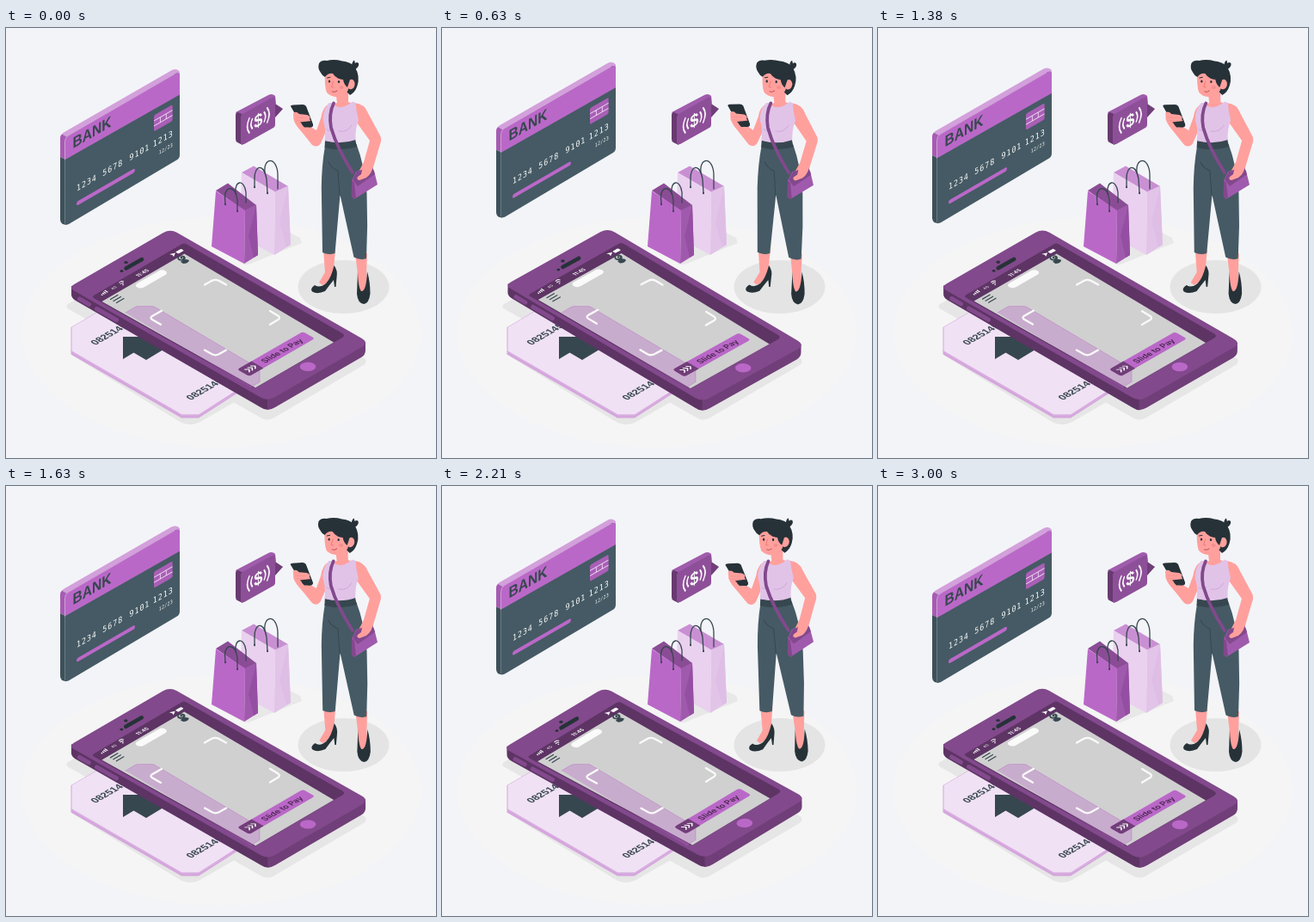
An HTML page with a canvas that plays this animation: 500 by 500 pixels, repeating every 3.04 s.

```html
<!DOCTYPE html>
<html lang="en">
<head>
<meta charset="utf-8">
<title>Mobile payment</title>
<style>
html, body { margin: 0; width: 100%; height: 100%; overflow: hidden; background: #f3f4f8; }
canvas { display: block; width: 100vw; height: 100vh; }
</style>
</head>
<body>
<canvas id="stage"></canvas>
<script>
const canvas = document.getElementById('stage');
const ctx = canvas.getContext('2d');
const scale = Math.max(1, window.devicePixelRatio || 1);
canvas.width = canvas.height = 500 * scale;

const LOOP = 3040, FPS = 24, FLOAT = 1500, SWAY = 3000;
const SANS = 'Inter, "Liberation Sans", sans-serif';
const ARIAL = '"Liberation Sans", Arial, sans-serif';
const MONO = '"DejaVu Sans Mono", monospace';
const C = {
  purple: '#ba68c8', mid: '#82498c', deep: '#5d3464', plum: '#703e78',
  slate: '#455a64', dark: '#37474f', ink: '#263238', skin: '#ffa09d',
  blush: '#f28f8f', lilac: '#e1c3e8', pale: '#f0e1f4', white: '#fafafa'
};
const FLOOR = [0.866, -0.5, 0.866, 0.5];
const WALL = [0.866, -0.5, 0, 1];

function fill(d, color) {
  ctx.fillStyle = color;
  ctx.fill(new Path2D(d));
}
function line(d, color, width) {
  ctx.strokeStyle = color;
  ctx.lineWidth = width;
  ctx.lineCap = ctx.lineJoin = 'round';
  ctx.stroke(new Path2D(d));
}
function oval(x, y, rx, ry, color, turn = 0) {
  ctx.beginPath();
  ctx.ellipse(x, y, rx, ry, turn, 0, 7);
  ctx.fillStyle = color;
  ctx.fill();
}
function bar(x, y, w, h, r, color) {
  ctx.beginPath();
  ctx.roundRect(x, y, w, h, r);
  ctx.fillStyle = color;
  ctx.fill();
}
// Runs draw() with the origin at x, y on an isometric plane.
function on(plane, x, y, draw) {
  ctx.save();
  ctx.transform(...plane, x, y);
  draw();
  ctx.restore();
}
function text(str, x, y, font, color, spacing = 0) {
  ctx.font = font;
  ctx.letterSpacing = spacing + 'px';
  ctx.fillStyle = color;
  ctx.fillText(str, x, y);
}
function turned(deg, x, y, draw) {
  ctx.save();
  ctx.translate(x, y);
  ctx.rotate(deg * Math.PI / 180);
  ctx.translate(-x, -y);
  draw();
  ctx.restore();
}

function ground() {
  ctx.fillStyle = '#f3f4f8';
  ctx.fillRect(0, 0, 500, 500);
  oval(250, 354, 232, 134, '#f5f5f5');
  oval(392.5, 301, 53, 31, '#e4e4e4');
  fill('M72 321 L190 254 L418 385 Q420 390 414 393 L312 453 Q304 458 296 453 L73 327 Q68 324 72 321Z', '#e6e6e6');
  fill('M76 380 L204 459 Q214 463 224 459 L290 421 L200 380Z', '#e6e6e6');
  fill('M240 254 L277 275 L282 275 L344 250 L342 244 L318 232Z', '#e8e8e8');
}

function ticket() {
  fill('M75.5 348 L120 322 L295 408 L224 453.5 L204 453.5 L75.5 379.5Z', '#d5a6dd');
  fill('M76.5 348 L120 322.5 L295 404 L224 449.5 L204.5 449.5 L76.5 375.5Z', C.pale);
  line('M76 376 L204.5 450 L224 450 L270 423', '#dbb3e2', 1);
  fill('M136 359 L176 359 L182 374.5 L163 386 L148.5 377.5 L136 385Z', C.dark);
  on(FLOOR, 104, 369, () => text('08251451', 0, 0, 'bold 11.4px ' + ARIAL, C.dark));
  on(FLOOR, 215, 433, () => text('08251451', 0, 0, 'bold 11.4px ' + ARIAL, C.dark));
}

function phoneBody() {
  fill('M76 300 L76 310 Q76 314 81 317 L296 441 Q300 444 305 444 L305 428 L100 296Z', C.deep);
  fill('M304 430 L304 444 Q308 444 313 441 L413 383 Q418 380 418 375 L418 365Z', C.plum);
  fill('M81 297 L183 238 Q191 233.5 199 238 L413 360.5 Q423 366 413 371.5 L312 429.5 Q304 434 296 429.5 L80 306 Q71.5 302 81 297Z', C.mid);
  line('M85.5 315 L96.5 321.3 M105.5 326.5 L128.5 339.5', C.mid, 5);
  fill('M102 311 L204 251.5 Q207 249.5 210 251.5 L391 355 Q395 357.5 391 360 L292 417.5 Q289 419 286 417.5 L102 314 Q100 312.5 102 311Z', C.deep);
  fill('M111.5 318 L207.5 262.5 L381 365.5 L290 418.3Z', '#d0d0d0');
  line('M139.5 279.5 L158 269', C.ink, 4.5);
  oval(139.5, 272.5, 2.3, 1.6, C.ink);
  oval(134.5, 282.7, 2, 1.4, C.ink);
  oval(351, 393.7, 9.3, 5.2, C.purple);
}

function statusBar() {
  for (let i = 0; i < 4; i++)
    line(`M${112 + i * 2} ${310.5 - i * 1.15} l${-0.8 - i * 0.7} ${-0.5 - i * 0.4}`, C.white, 1.2);
  on(FLOOR, 124, 304.5, () => text('4G', 0, 0, '4.5px ' + SANS, C.white));
  line('M131.5 296 Q133.5 293.5 136.5 294.5 M133 297.5 Q134.5 295.8 136.5 296.5', C.white, 1);
  oval(136, 298.5, 0.9, 0.7, C.white);
  on(FLOOR, 154, 289.7, () => text('11:45', 0, 0, 'bold 6px ' + SANS, C.white));
  fill('M190 263 L197 261.5 L195 266 L193.6 264Z', C.white);
  on(FLOOR, 197, 260.5, () => bar(0, 0, 7.5, 4, 1, C.white));
}

function phoneScreen() {
  on(FLOOR, 148.6, 299.2, () => bar(0, 0, 38, 9, 4.5, C.white));
  for (let i = 0; i < 3; i++)
    line(`M${121.5 + i * 3.5} ${315.5 + i * 2} l8.5 -5`, C.dark, 1.2);
  oval(204, 267.5, 4.7, 3.1, C.dark);
  oval(203.5, 267.2, 2.6, 1.7, '#d0d0d0');
  oval(204, 267, 1.4, 1.2, C.dark);
  fill('M203 272 Q207 267 213 270 Q212 274 206 274Z', C.dark);
  line('M231 298.5 L239.5 293.8 Q243.5 291.8 247.5 293.8 L256 298.5 M181 328.8 L170 335 Q167 337 170 339 L180 344.7 M231 374.5 L239.5 379.3 Q243.5 381.3 247.5 379.3 L256 374.5 M307 329 L316.5 334.8 Q319.5 337 316.5 339 L307 344.7', C.white, 2.3);
  on(FLOOR, 269, 397, () => {
    bar(0, 0, 88, 16, 3, C.purple);
    bar(0, 0, 19, 16, [3, 0, 0, 3], C.plum);
    for (let i = 0; i < 3; i++) line(`M${5 + i * 4} 5 l3 3 l-3 3`, C.white, 1.3);
    text('Slide to Pay', 25.5, 11.6, '600 9.3px ' + SANS, '#4a2850');
  });
}

function reflection() {
  const top = 'M139 331 L150 324.6 Q152 323.6 154 323.6 L169 323.6 Q172 323.6 174 325 L295 396.5 L295 411.5 L284.5 417.7';
  fill(top + 'Z', 'rgba(186,104,200,.34)');
  line(top, 'rgba(186,104,200,.4)', 1);
}

function phone(angle) {
  turned(angle, 247, 340.5, () => {
    phoneBody();
    statusBar();
  });
  reflection();
  turned(angle, 247, 340.5, phoneScreen);
}

function bags() {
  fill('M274 168 L288 160.5 L328 184 L313 191Z', '#c98fd3');
  fill('M274 168 L313 190.5 L312 264 L272 242Z', '#ead1ef');
  fill('M313 190.5 L328 183.5 L331 252 L312 264Z', '#e2c4e8');
  fill('M318 226 L328 184 L331 252 L326 255Z', '#dfbee6');
  line('M301 168 C299 150 315 149 316 170 L316 187', C.dark, 1.3);
  line('M289 185 L289 175 C289 159 300 157 303 176 L304 192', C.dark, 1.3);

  fill('M244 189 L258 180.5 L291 206 L278 213Z', '#8a4d95');
  fill('M244 189.5 L278 212 L277 274 L239 254Z', C.purple);
  fill('M278 212 L291 205.5 L293 264 L277 274Z', '#a05aad');
  fill('M282 242 L291 206 L293 264 L288 267Z', '#954fa2');
  line('M267 193 C265 177 277 175 279 191 L279 203', C.dark, 1.3);
  line('M255 205 L254.5 196 C255 183 267 183 269 200 L269 213', C.dark, 1.3);
  for (const [x, y] of [[255, 205], [269, 213], [289, 185], [304, 192]]) oval(x, y, 1, 1.2, C.dark);
}

function bubble() {
  fill('M267 98 L306 77.5 Q310 76 313 79 L314 88 L275 106Z', '#a05cac');
  fill('M313 88 L322 94 L313 104Z', C.plum);
  fill('M267 101 Q267 98 270 98 L278 102 L275 136 L269 133 Q267 132 267 129Z', '#683a70');
  fill('M273 104 Q273 101 276 99.5 L309 81 Q313 79.5 313 83.5 L313 112 Q313 115 310 116.5 L277 135 Q273 136.5 273 132.5Z', '#8e4f99');
  on(WALL, 293.3, 107.3, () => {
    ctx.textAlign = 'center';
    text('$', 0, 7.2, 'bold 21px ' + ARIAL, C.white);
    ctx.textAlign = 'left';
    for (const s of [-1, 1]) {
      line(`M${s * 8} -5.5 Q${s * 11.5} 0 ${s * 8} 5.5`, C.white, 1.9);
      line(`M${s * 12} -8.5 Q${s * 17.5} 0 ${s * 12} 8.5`, C.white, 1.9);
    }
  });
}

function card(dy) {
  ctx.save();
  ctx.translate(0, dy);
  fill('M63 129 Q63 124 67 121.5 L192 49.5 Q199 46 202 51 L202 66 L69 152 L63 149Z', '#d3a0db');
  fill('M63 128 Q63 125 65 123.5 L71 127 L70 153 L63 150Z', '#a65cb3');
  fill('M63 150 L70 153 L70 229 L66 228 Q63 226 63 222Z', '#3e515a');
  const face = 'M68.5 132 Q68.5 127.5 72.5 125 L196 53.5 Q202 50.5 202 56 L202 147.5 Q202 151.5 198.5 153.5 L73 228 Q68.5 230 68.5 226Z';
  fill(face, C.slate);
  ctx.save();
  ctx.clip(new Path2D(face));
  fill('M60 40 L210 40 L210 73 L60 158Z', C.purple);
  ctx.restore();
  line('M68.5 227 L68.5 154', '#74868e', 0.8);
  line('M68.5 153 L68.5 132 Q68.5 127.5 72.5 125 L196 53.5', '#dcb0e3', 0.8);

  on(WALL, 77.5, 140.2, () => text('BANK', 0, 0, 'bold 18px ' + ARIAL, C.dark));
  on(WALL, 82, 190, () => {
    ['1234', '5678', '9101', '1213'].forEach((s, i) =>
      text(s, [0, 35, 71, 102.5][i], 0, '9.6px ' + MONO, C.white, 1.1));
    text('12/23', 110.5, 12.3, '5.8px ' + MONO, C.white, 0.3);
    bar(0, 12.2, 78.5, 4.6, 2.3, C.purple);
  });
  on(WALL, 172, 101.5, () => {
    bar(0, 0, 25, 19, 2, '#a95fb6');
    line('M0.5 6.5 H24.5 M0.5 12.5 H24.5 M8.5 6.5 V12.5 M16.5 6.5 V12.5', '#f0dcf4', 1);
  });
  ctx.restore();
}

function legs() {
  fill('M369 258 L383 258 L381 280 L380 292 L368 299 L364 296 L371 284Z', C.skin);
  fill('M406 262 L420 262 L419 285 L421 306 L409 306 L409 286Z', C.skin);
  fill('M381.5 276 Q386 282 384.5 290 L383.5 301 L382 301 L381 293 Q376 299 371 306 Q362 310 356 306.5 Q353 303 359 299 Q365 303 372 297 Q378 291 381.5 276Z', C.ink);
  fill('M409 283 Q409.5 302 413 306 Q419 307 420 283 Q423.5 295 423.5 309 Q422 320.5 416 321 Q409 320 408 309Z', C.ink);
  fill('M371 137 Q367 160 366.8 186 L368 261 Q375 264.5 382.5 262 L388.5 194 L404.5 266.5 Q412 270.5 419 268 Q421 230 419.5 192 Q417 160 407.5 135Z', C.slate);
  fill('M371 131 Q390 134 406 129 L408 138 Q390 144 370.5 139Z', C.dark);
  line('M388 195 L386 166 Q378 163 375 156', C.dark, 1);
}

function torso() {
  fill('M405 87 Q417 88 421 99 L435.5 126 Q437 130 435 135 L427 162 Q421 176 413 177 L408 171 L416 156 L423 131 L408 110Z', C.skin);
  fill('M376 88 Q368 92 366.5 104 L361 119 L356 116 L352 102 L342 103 L344 121 L356 136 Q362 140 366 134 L376 111Z', C.skin);
  fill('M383 72 L398 70 L398 86 Q402 88 408 88 L400 100 Q386 102 374 91 L385 87Z', C.skin);
  fill('M375.5 87 L379 87 Q388 98 403 85.5 L406.5 87 Q407 96 410 107 Q406 117 406.5 130 Q390 136 370.5 131 Q372 120 370 112 Q367 104 371 94Z', C.lilac);
  line('M387 120 Q397 122 402 113 M373 118 Q377 121 381 118', '#c9a2d3', 0.8);
}

function handbag() {
  line('M381 87.5 Q375 100 378 116 Q385 140 403 168', C.mid, 3.8);
  fill('M402 177 L407 167 L425 161 L428 166 L432 182 L405 199 L402 196Z', '#a05aad');
  fill('M402 177 L405 180 L407 198 L404 199 L401.5 195Z', C.mid);
  fill('M403 176 L408 167 L426 162 L429 170 L409 184Z', C.mid);
  fill('M416 156 L427 159 Q426 169 419 174 L411 177 Q407 176 409 173 L413 170Z', C.skin);
}

function handset() {
  fill('M331 91 Q331 89.5 334 89.5 L345 89 Q347.5 89 349 91 L357 112 Q357.5 115 354 115.3 L347 115.5 L342 110Z', C.ink);
  fill('M334 99 Q337 96 341 100 L350 101 Q355 103 353 106 L355 109 L350 111 L344 110 L345 122 Q337 114 334.5 107Z', C.skin);
  line('M337 104 L348 104.5 M338 107.5 L347 108', C.blush, 0.7);
  fill('M342 109.5 L355 108 L357 113 Q357 115.5 353 115.5 L347 114.5Z', C.ink);
}

function head() {
  fill('M385 40 Q400 37 406 46 Q412 56 408.5 67 Q406 75 400 78 L392 70Z', C.ink);
  fill('M371 50 L396 48 L399 68 Q397 78 388 80 Q378 81 373 75 Q370 68 371 50Z', C.skin);
  oval(401, 65.5, 4.6, 5.8, C.skin, 0.2);
  fill('M366 52 Q362 47 364 41 Q367 37 373 38 Q382 36 391 38.5 Q398 39 404 44 Q410 52 408 63 Q405 57 400 60 L397 69 Q393 66 392 60 Q384 59 380 53 Q375 52 371 57 Q368 56 366 52Z', C.ink);
  fill('M402 45 Q402 39 405 37.5 L406 41 Q408 39 410 41 Q411 45 406 48Z', C.ink);
  oval(376, 62, 1.2, 1.6, C.ink);
  oval(387, 62.5, 1.2, 1.6, C.ink);
  line('M373.5 58 L377 57.3 M386 57.8 L390 59', C.ink, 1);
  line('M380.5 62 L378.5 68.5 L381 69', '#e8736f', 0.8);
  line('M379.5 74 Q382 75.5 385 73', '#b8454f', 0.9);
  oval(390, 69, 2.6, 2, C.blush);
}

function woman() {
  legs();
  torso();
  handbag();
  handset();
  head();
}

const rise = t => -10 * (1 - Math.abs(1 - 2 * (t % FLOAT) / FLOAT));
// Linear sway: 0 to 1 degree, down to -1, back to 0.
function sway(t) {
  const p = (t % SWAY) / SWAY * 4;
  return p < 1 ? p : p < 3 ? 2 - p : p - 4;
}

function draw(t) {
  const angle = sway(t);
  ctx.setTransform(scale, 0, 0, scale, 0, 0);
  ground();
  ticket();
  phone(angle);
  bags();
  bubble();
  card(rise(t));
  turned(angle, 384, 179.5, woman);
}

const start = performance.now();
function tick() {
  const t = (performance.now() - start) % LOOP;
  draw(Math.floor((t + 5) * FPS / 1000) / FPS * 1000);
  requestAnimationFrame(tick);
}
tick();
</script>
</body>
</html>
```
